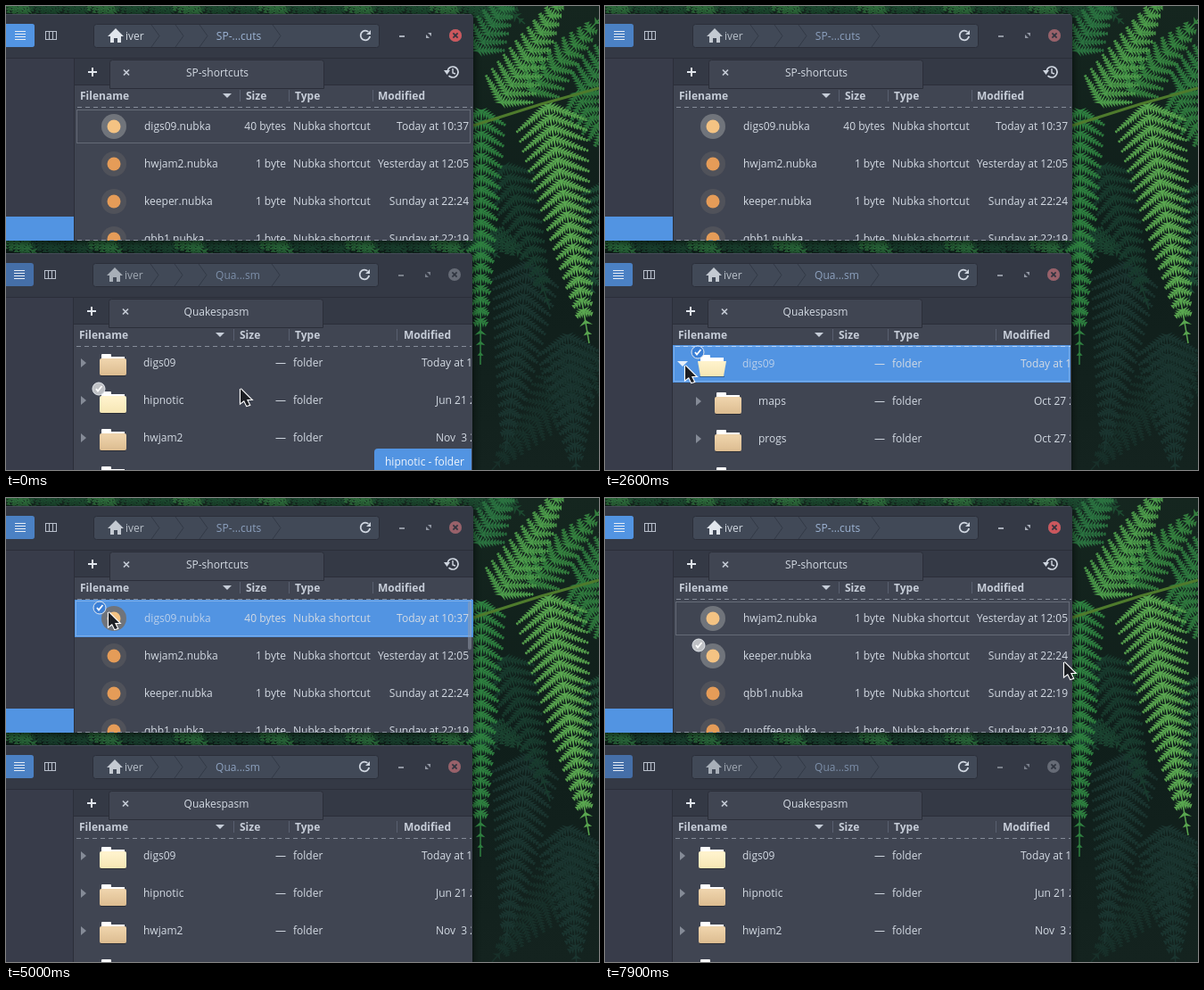
Animation, 665 px wide and 520 px high, one loop 8000 ms. Source, as an HTML page with a canvas:

```html
<!DOCTYPE html>
<html lang="en">
<head>
<meta charset="utf-8">
<title>File manager</title>
<style>
html, body { margin: 0; width: 100%; height: 100%; overflow: hidden; background: #0f1b18; }
canvas { display: block; }
</style>
</head>
<body>
<canvas id="stage" width="665" height="520"></canvas>
<script>
const W = 665, H = 520, LOOP = 8000;
const stage = document.getElementById('stage');
let c = stage.getContext('2d');

const TEXT = '#d3dae3', BLUE = '#5294e2', LIST = '#404552', BAR = '#343945', SIDE = '#383c4a', EDGE = '#2b2e39';
const FONT = '"Open Sans", "Noto Sans", sans-serif';

// Moments of the clicks, in ms
const OPEN = 2500, FOLD = 3300, PICK = 4900, MENU = 5500, TRASH = 7300;

// Cursor path: time, x, y
const PATH = [[0, 263, 429], [900, 197, 425], [1600, 88, 404], [2500, 90, 403], [3500, 90, 403],
  [4200, 141, 146], [4800, 115, 128], [5600, 115, 128], [6100, 136, 164], [6900, 180, 346],
  [7300, 180, 346], [7900, 515, 184], [8000, 515, 184]];

const clamp = v => Math.max(0, Math.min(1, v));

function rect(x, y, w, h, color) {
  c.fillStyle = color;
  c.fillRect(x, y, w, h);
}
function round(x, y, w, h, r, fill, stroke) {
  c.beginPath();
  c.roundRect(x, y, w, h, r);
  if (fill) { c.fillStyle = fill; c.fill(); }
  if (stroke) { c.strokeStyle = stroke; c.lineWidth = 1; c.stroke(); }
}
function disc(x, y, r, fill, stroke, width = 1) {
  c.beginPath();
  c.arc(x, y, r, 0, 7);
  if (fill) { c.fillStyle = fill; c.fill(); }
  if (stroke) { c.strokeStyle = stroke; c.lineWidth = width; c.stroke(); }
}
function line(points, color, width = 1) {
  c.beginPath();
  for (let i = 0; i < points.length; i += 2) c.lineTo(points[i], points[i + 1]);
  c.strokeStyle = color;
  c.lineWidth = width;
  c.stroke();
}
function poly(points, color) {
  c.beginPath();
  for (let i = 0; i < points.length; i += 2) c.lineTo(points[i], points[i + 1]);
  c.closePath();
  c.fillStyle = color;
  c.fill();
}
// y is the middle of the line
function text(s, x, y, color = TEXT, align = 'left', weight = 400) {
  c.font = `${weight} 12px ${FONT}`;
  c.textAlign = align;
  c.fillStyle = color;
  c.fillText(s, x, y + 5);
}
function cross(x, y, r, color, width) {
  line([x - r, y - r, x + r, y + r], color, width);
  line([x - r, y + r, x + r, y - r], color, width);
}
function dashes(x1, x2, y, color) {
  c.setLineDash([5, 4]);
  line([x1, y, x2, y], color);
  c.setLineDash([]);
}
function dotted(x, y, w, h, color) {
  c.setLineDash([1, 1]);
  round(x, y, w, h, 0, null, color);
  c.setLineDash([]);
}
function faded(alpha, draw) {
  c.save();
  c.globalAlpha *= alpha;
  draw();
  c.restore();
}

// ---- Wallpaper ----
function frond(x0, y0, x1, y1, width, n, color, depth = 1) {
  const dir = Math.atan2(y1 - y0, x1 - x0);
  if (depth) line([x0, y0, x1, y1], color, 1.5);
  for (let i = 0; i < n; i++) {
    const t = i / n, x = x0 + (x1 - x0) * t, y = y0 + (y1 - y0) * t;
    const len = width * (1 - t) ** 0.75 + 1;
    for (const side of [-1, 1]) {
      const a = dir + side * 1.05, ex = x + len * Math.cos(a), ey = y + len * Math.sin(a);
      if (depth && len > 9) {
        frond(x, y, ex, ey, 7, Math.ceil(len / 3.6), color, 0);
        continue;
      }
      const px = Math.cos(dir) * 2, py = Math.sin(dir) * 2;
      poly([x - px, y - py, ex, ey, x + px, y + py], color);
    }
  }
}
function paintWallpaper() {
  const g = c.createLinearGradient(0, 0, 0, H);
  g.addColorStop(0, '#15261f');
  g.addColorStop(0.5, '#0f1e1a');
  g.addColorStop(1, '#14231f');
  rect(0, 0, W, H, g);
  for (let i = 0; i < 18; i++) {
    const x = i * 32;
    frond(x, -12, x + 38, 20, 18, 7, i % 3 ? '#1d4a30' : '#2e6b3c');
    frond(x, 256, x + 42, 282, 17, 7, i % 3 ? '#1b4230' : '#2b6a3c');
  }
  const dark = '#1b3530', deep = '#18302a';
  frond(660, 390, 545, 520, 48, 16, deep);
  frond(585, 290, 560, 500, 44, 18, dark);
  frond(630, 370, 640, 525, 42, 14, dark);
  frond(560, 180, 610, 340, 34, 14, '#193b2e');
  frond(675, 200, 655, 330, 32, 11, '#1e4a35');
  frond(530, 50, 572, -25, 30, 8, '#2b7240');
  frond(590, 95, 670, 10, 32, 10, '#35803f');
  frond(556, 108, 628, -18, 36, 13, '#4c9a4a');
  frond(650, 98, 690, 20, 32, 8, '#2f7a3f');
  frond(640, 98, 690, 180, 30, 9, '#2f783d');
  frond(533, 118, 532, 402, 32, 23, '#2f8040');
  frond(608, 112, 654, 378, 47, 22, '#5aa650');
  line([524, 134, 600, 110, 665, 92], '#4e7a2c', 3);
}
const wallpaper = document.createElement('canvas');
wallpaper.width = W;
wallpaper.height = H;
const screen = c;
c = wallpaper.getContext('2d');
paintWallpaper();
c = screen;

// ---- Windows ----
function headerBar(crumb, focus) {
  round(-3, 20, 35, 26, 3, '#456fa8');
  faded(focus, () => round(-3, 20, 35, 26, 3, BLUE));
  for (let i = 0; i < 4; i++) rect(10, 28 + i * 3, 12, 1, '#e8eef6');
  for (let i = 0; i < 3; i++) {
    c.strokeStyle = '#b9c0cc';
    c.lineWidth = 1;
    c.strokeRect(44.5 + i * 4, 28.5, 4, 9);
  }

  round(98.5, 20.5, 320, 26, 3, '#414957', EDGE);
  for (const x of [163, 190, 217, 299]) line([x, 21, x + 9, 33.5, x, 46], '#323946');
  faded(0.65 + 0.35 * focus, () => {
    poly([114, 34, 123, 25, 132, 34, 129, 34, 129, 41, 125, 41, 125, 36, 121, 36, 121, 41, 117, 41, 117, 34], '#e1e6ed');
    text('iver', 134, 33);
    text(crumb, 261, 33, '#9db4d4', 'center');
  });
  c.beginPath();
  c.arc(403, 33, 5.3, 0.2, 5.4);
  c.strokeStyle = '#cfd6e0';
  c.lineWidth = 1.8;
  c.stroke();
  poly([409, 27, 409, 32, 404, 32], '#cfd6e0');

  faded(0.6 + 0.4 * focus, () => {
    rect(441, 33, 6, 2, '#a9afba');
    poly([473, 30, 477, 30, 477, 34], '#a9afba');
    poly([471, 32, 471, 36, 475, 36], '#a9afba');
  });
  disc(504, 33, 7, '#666b76');
  faded(focus, () => disc(504, 33, 7, '#cc575d'));
  cross(504, 33, 2.6, '#2f343f', 1.6);
}

function tabBar(title) {
  rect(77, 59, 447, 30, BAR);
  rect(77, 88, 447, 1, EDGE);
  round(116.5, 60.5, 240, 32, [3, 3, 0, 0], LIST, EDGE);
  rect(92, 73, 10, 2, '#e1e6ed');
  rect(96, 69, 2, 10, '#e1e6ed');
  cross(135, 74.5, 3, '#c3cad5', 1.7);
  text(title, 237, 74, TEXT, 'center');
}

function columns([arrow, s1, size, s2, type, s3, modified]) {
  const labels = [['Filename', 83], ['Size', size], ['Type', type], ['Modified', modified]];
  for (const [s, x] of labels) text(s, x, 100, '#c6cdd8', 'left', 700);
  poly([arrow - 5, 98, arrow + 5, 98, arrow, 103], '#c6cdd8');
  for (const x of [s1, s2, s3]) rect(x, 94, 1, 13, '#596070');
}

function frame(height, title, crumb, focus, cols) {
  c.save();
  c.shadowColor = 'rgba(0,0,0,.7)';
  c.shadowBlur = 9;
  c.shadowOffsetY = 2;
  round(-6, 9, 530, height, [0, 4, 0, 0], BAR);
  c.restore();
  rect(0, 9, 522, 1, '#454b58');
  headerBar(crumb, focus);
  rect(0, 58, 524, 1, EDGE);
  rect(0, 59, 76, height - 50, SIDE);
  rect(76, 59, 1, height - 50, EDGE);
  rect(77, 89, 447, height - 80, LIST);
  tabBar(title);
  columns(cols);
}

function badge(x, y, color) {
  disc(x, y, 7, color, '#e4e8ee');
  line([x - 3, y, x - 1, y + 2.5, x + 3.5, y - 3], '#fff', 1.8);
}

function folder(x, y, bright, open) {
  round(x + 2, y - 11, 11, 6, 1, '#fff');
  rect(x + 2, y - 8, 26, 7, '#fff');
  const g = c.createLinearGradient(0, y - 4, 0, y + 13);
  g.addColorStop(0, bright ? '#fff3cd' : '#eed3ab');
  g.addColorStop(1, bright ? '#f6e6b4' : '#dcbc90');
  if (open) poly([x - 1, y - 4, x + 31, y - 4, x + 28, y + 13, x + 2, y + 13], g);
  else round(x, y - 6, 30, 19, 2, g);
  rect(x + 1, y + 13, 28, 1, 'rgba(0,0,0,.35)');
}

const FILES = [
  ['digs09', '40 bytes', 'Today at 10:37'],
  ['hwjam2', '1 byte', 'Yesterday at 12:05'],
  ['keeper', '1 byte', 'Sunday at 22:24'],
  ['qbb1', '1 byte', 'Sunday at 22:19'],
  ['quoffee', '1 byte', 'Sunday at 22:19']];

function topWindow(t, focus) {
  frame(254, 'SP-shortcuts', 'SP-...cuts', focus, [248, 262, 269, 317, 324, 411, 417]);
  rect(0, 236, 76, 27, BLUE);
  c.beginPath();
  c.arc(501, 74, 6, -2.8, 2.4);
  c.strokeStyle = '#cfd6e0';
  c.lineWidth = 1.7;
  c.stroke();
  poly([491, 72, 498, 72, 494.5, 77], '#cfd6e0');
  line([501, 70, 501, 75, 504, 76], '#cfd6e0', 1.4);

  const picked = t >= PICK && t < TRASH;
  let hover = -1;
  if (t >= 4000 && t < TRASH) hover = t < 4300 ? 1 : 0;
  if (t >= 7600) hover = t < 7700 ? 2 : 1;

  c.save();
  c.beginPath();
  c.rect(77, 114, 447, 149);
  c.clip();
  if (picked) {
    rect(77, 114, 447, 42, BLUE);
    if (t < MENU) dotted(78.5, 115.5, 443, 39, '#a5c8f3');
  } else if (t < OPEN || t >= TRASH) {
    dotted(79.5, 116.5, 441, 37, '#8b919d');
  }
  FILES.slice(t < TRASH ? 0 : 1).slice(0, 4).forEach(([name, size, date], i) => {
    const y = 134 + i * 42, on = picked && i === 0, lit = i === 0 || i === hover;
    disc(121, y + 1, 14, lit ? '#70747b' : '#50525a');
    disc(121, y + 1, 7.5, lit ? '#f4c383' : '#e59c58');
    text(name + '.nubka', 155, y, on ? '#b9cfeb' : TEXT);
    text(size, 314, y, TEXT, 'right');
    text('Nubka shortcut', 322, y);
    text(date, 519, y, TEXT, 'right');
    if (i === hover) badge(105, y - 11, on ? '#3b7fd6' : '#bfc1c5');
  });
  if (t >= 4000 && t < TRASH) round(518, 116, 4, 54, 2, 'rgba(150,158,172,.5)');
  c.restore();
  dashes(80, 523, 113.5, '#858c99');
  dashes(80, 523, 262.5, '#858c99');
}

const ROOT = [['digs09', 'Today at 10:37', 466], ['hipnotic', 'Jun 21 2017', 482],
  ['hwjam2', 'Nov\u00a0 3 2017', 482], ['id1', 'Nov\u00a0 3 2017', 482]];
const INNER = [['maps', 'Oct 27 2017', 481], ['progs', 'Oct 27 2017', 481], ['sound', 'Oct 27 2017', 481]];

function bottomWindow(t, focus) {
  c.save();
  c.translate(-1, 268);
  frame(252, 'Quakespasm', 'Qua...sm', focus, [241, 256, 263, 318, 325, 439, 447]);
  c.restore();

  const picked = t >= OPEN && t < PICK, open = t >= OPEN && t < FOLD;
  const hover = t < 1000 ? 1 : t < PICK ? 0 : -1;
  c.save();
  c.beginPath();
  c.rect(76, 380, 446, 140);
  c.clip();
  if (picked) {
    rect(76, 380, 446, 42, BLUE);
    dotted(77.5, 381.5, 443, 39, '#a5c8f3');
  }
  const rows = open ? [ROOT[0], ...INNER] : ROOT;
  rows.forEach(([name, date, x], i) => {
    const y = (t < OPEN ? 399 : 400) + i * 42;
    const dx = open && i ? 18 : 0, on = picked && i === 0;
    const lit = i === hover || i === 0 && t >= OPEN;
    if (open && !i) poly([81, y - 2, 93, y - 2, 87, y + 4], '#e6effa');
    else poly([84 + dx, y - 4, 90 + dx, y + 1, 84 + dx, y + 6], on ? '#b9d3f3' : '#858b97');
    folder(105 + dx, y + 2, lit, open && !i);
    text(name, 154 + dx, y, on ? '#b9cfeb' : TEXT);
    text('—', 314, y, TEXT, 'right');
    text('folder', 322, y);
    text(date, x, y);
    if (i === hover) badge(104, y - 12, on ? '#3b7fd6' : '#bfc1c5');
  });
  if (t < 1000) {
    const full = t >= 500, x = full ? 351 : 413;
    round(x, 496, 200, 40, [4, 0, 0, 0], BLUE);
    text('hipnotic - folder' + (full ? ' (3 files, 2.6 kB)' : ''), x + 12, 510, '#eef4fc');
  }
  c.restore();
  dashes(79, 522, 381.5, picked ? '#b5d2f5' : '#858c99');
}

// ---- Context menu: label, middle, keys ----
const ITEMS = [['Open in Nubka', 154, 'Enter'], ['Open with', 187, ''], ['Cut', 225, 'Ctrl X'],
  ['Copy', 264, 'Ctrl C'], ['Copy as Link', 303, 'Shift Ctrl C'], ['Move to Trash', 347, 'Delete'],
  ['Rename...', 386, 'F2'], ['Bookmark', 425, 'Ctrl D'], ['Properties', 469, 'Alt Enter']];

function menu(cx, cy) {
  c.save();
  c.shadowColor = 'rgba(0,0,0,.6)';
  c.shadowBlur = 8;
  c.shadowOffsetY = 2;
  round(116.5, 130.5, 322, 420, 3, SIDE, EDGE);
  c.restore();
  for (const [label, y, keys] of ITEMS) {
    const half = keys ? 19 : 14;
    if (cx > 117 && Math.abs(cy - y) <= half) rect(117, y - half + 1, 321, half * 2 - 1, BLUE);
    text(label, 146, y);
    let right = 432;
    for (const key of keys.split(' ').reverse()) {
      if (!key) continue;
      c.font = `12px ${FONT}`;
      const w = Math.max(29, Math.round(c.measureText(key).width + 12));
      round(right - w + 0.5, y - 13.5, w, 27, 3, '#343843', '#262932');
      rect(right - w + 2, y + 13, w - 3, 1, '#4a4f5c');
      text(key, right - w / 2 + 0.5, y - 1, TEXT, 'center');
      right -= w + 4;
    }
  }
  poly([423, 182, 428, 187, 423, 192], TEXT);
  for (const y of [203, 325, 447, 491]) rect(117, y, 321, 1, '#525867');
  disc(161, 509, 9, null, '#8d939f', 1.5);
  cross(161, 509, 3.2, '#a4aab5', 1.4);
  for (let i = 0; i < 8; i++) disc(191 + i * 29, 509, 8.5, '#303440', '#d3dae3', 1.6);
}

function cursorAt(t) {
  const i = PATH.findIndex(p => p[0] > t);
  const [t0, x0, y0] = PATH[i - 1], [t1, x1, y1] = PATH[i];
  let k = (t - t0) / (t1 - t0);
  k = k * k * (3 - 2 * k);
  return [x0 + (x1 - x0) * k, y0 + (y1 - y0) * k];
}
function cursor(x, y) {
  const shape = [0, 0, 0, 16, 4, 13, 7, 19, 10, 18, 7, 12, 12, 12].map((v, i) => v + (i % 2 ? y : x));
  line([...shape, shape[0], shape[1]], '#fff', 2.2);
  poly(shape, '#1d1f24');
}

function draw(t) {
  c.drawImage(wallpaper, 0, 0);
  const lower = clamp((t - OPEN + 50) / 300) * (1 - clamp((t - PICK + 50) / 300));
  topWindow(t, 1 - lower);
  bottomWindow(t, lower);
  const [x, y] = cursorAt(t);
  if (t >= MENU && t < TRASH) menu(x, y);
  cursor(x, y);
}

let start;
function tick(now) {
  start ??= now;
  draw(Math.floor((now - start) % LOOP / 100) * 100);
  requestAnimationFrame(tick);
}
requestAnimationFrame(tick);
</script>
</body>
</html>
```
